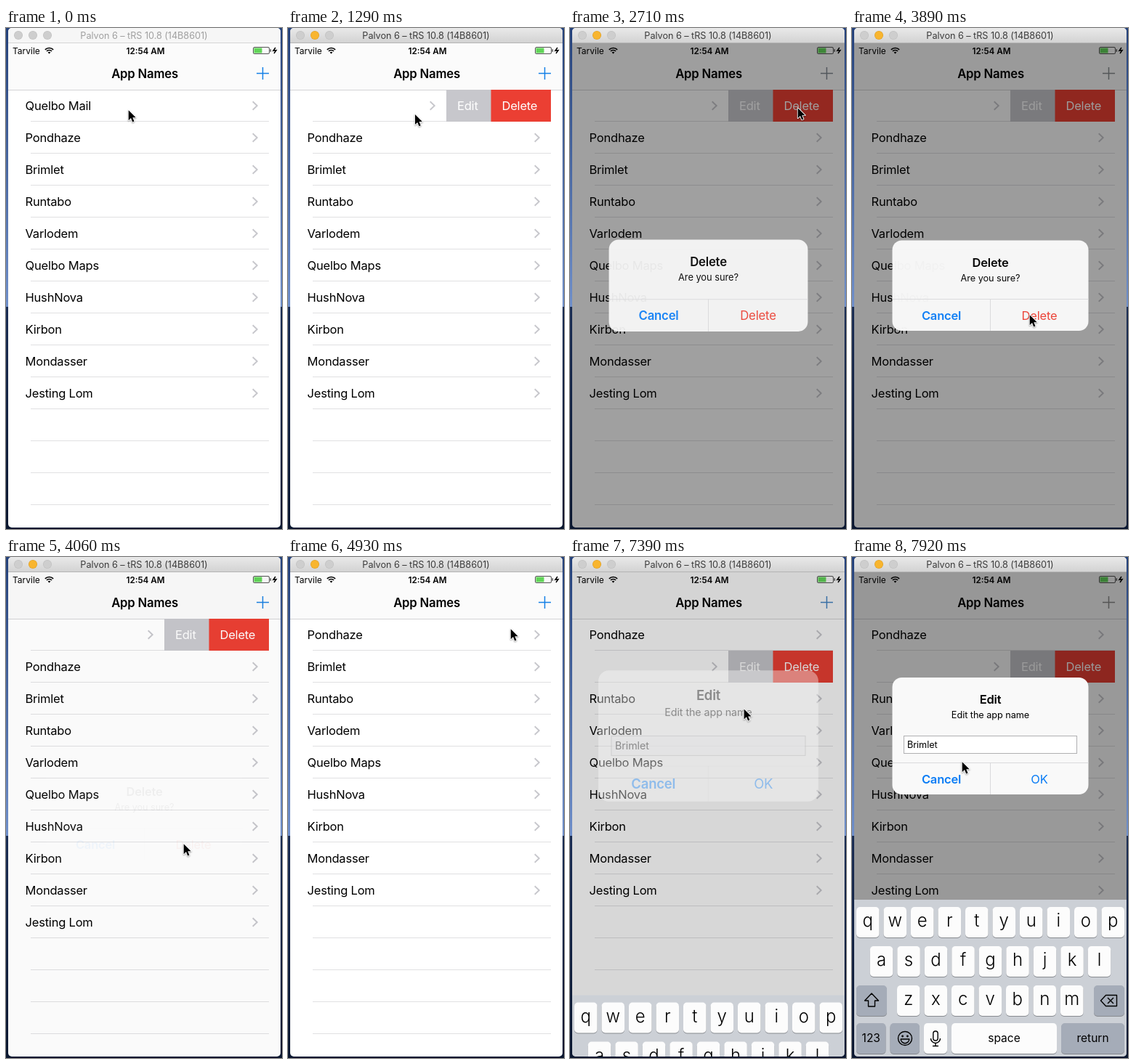
An HTML page with a canvas for the animation above (8 s loop, 380x690 px).

```html
<!DOCTYPE html>
<html lang="en">
<head>
<meta charset="utf-8">
<title>App Names</title>
<style>
html, body { margin: 0; width: 100%; height: 100%; overflow: hidden; background: #0d1c38; }
canvas { display: block; width: 380px; height: 690px; }
</style>
</head>
<body>
<canvas id="stage"></canvas>
<script>
const W = 380, H = 690, LOOP = 8000;
const ROW = 44, TOP = 85, LEFT = 19, RIGHT = 362, OPEN = 144;
const BLUE = '#0a7cf5', RED = '#eb3f33', GREY = '#c7c7cc', HAIR = '#e0e0e2';
const FONT = 'Inter, "Noto Sans", sans-serif';
const NAMES = ['Quelbo Mail', 'Pondhaze', 'Brimlet', 'Runtabo', 'Varlodem',
  'Quelbo Maps', 'HushNova', 'Kirbon', 'Mondasser', 'Jesting Lom'];

// Pointer moves, each from where the last one ended
const MOVES = [
  { at: 250, dur: 420, x: 50, y: 113 },
  { at: 760, dur: 350, x: 171, y: 118 },
  { at: 1230, dur: 680, x: 313, y: 109 },
  { at: 2760, dur: 900, x: 244, y: 394 },
  { at: 4480, dur: 450, x: 306, y: 98 },
  { at: 4930, dur: 440, x: 296, y: 148 },
  { at: 5470, dur: 400, x: 160, y: 148 },
  { at: 5890, dur: 610, x: 252, y: 150 },
  { at: 6960, dur: 250, x: 244, y: 204 },
  { at: 7310, dur: 570, x: 151, y: 281 },
];

const canvas = document.getElementById('stage');
const dpr = window.devicePixelRatio || 1;
canvas.width = W * dpr;
canvas.height = H * dpr;
const c = canvas.getContext('2d');

const ramp = (t, start, dur) => Math.min(1, Math.max(0, (t - start) / dur));
const easeOut = x => 1 - Math.pow(1 - x, 2.5);
const easeInOut = x => x < .5 ? 8 * x ** 4 : 1 - 8 * (1 - x) ** 4;
const smooth = x => x * x * (3 - 2 * x);
const mix = (a, b, p) => a + (b - a) * p;

function pointer(t) {
  let x = 168, y = 112;
  for (const m of MOVES) {
    const p = smooth(ramp(t, m.at, m.dur));
    x = mix(x, m.x, p);
    y = mix(y, m.y, p);
  }
  return [x, y];
}

function text(str, x, y, size, { color = '#000', weight = 400, align = 'left', track = -.2 } = {}) {
  c.font = `${weight} ${size}px ${FONT}`;
  c.letterSpacing = track + 'px';
  c.textAlign = align;
  c.fillStyle = color;
  c.fillText(str, x, y);
}

function rect(x, y, w, h, color) {
  c.fillStyle = color;
  c.fillRect(x, y, w, h);
}

function box(x, y, w, h, r, color) {
  c.beginPath();
  c.roundRect(x, y, w, h, r);
  c.fillStyle = color;
  c.fill();
}

function disc(x, y, r, color) {
  c.beginPath();
  c.arc(x, y, r, 0, Math.PI * 2);
  c.fillStyle = color;
  c.fill();
}

function line(points, color, width, close) {
  c.beginPath();
  points.forEach(([x, y]) => c.lineTo(x, y));
  if (close) c.closePath();
  c.strokeStyle = color;
  c.lineWidth = width;
  c.stroke();
}

function gradient(top, bottom, y, h) {
  const g = c.createLinearGradient(0, y, 0, y + h);
  g.addColorStop(0, top);
  g.addColorStop(1, bottom);
  return g;
}

function desktop() {
  const horizon = 384;
  rect(0, 0, W, horizon, gradient('#24417a', '#6f8fca', 0, horizon));
  rect(0, horizon, W, H - horizon, gradient('#1a2d54', '#0b1730', horizon, H - horizon));
}

function titleBar(active) {
  rect(3, 0, 375, 20, active ? gradient('#e9e9e9', '#d3d3d3', 0, 20) : '#f6f6f6');
  rect(3, 20, 375, 1, active ? '#b4b4b4' : '#d6d6d6');
  for (let i = 0; i < 3; i++) {
    const lit = active && i === 1;
    disc(17 + 20 * i, 10, 6, lit ? '#dd9f26' : '#bfbfbf');
    disc(17 + 20 * i, 10, 5.4, lit ? '#f8b52f' : '#cecece');
  }
  text('Palvon 6 – tRS 10.8 (14B8601)', 190, 14.5, 12.7,
    { align: 'center', color: active ? '#3d3d3d' : '#a0a0a0', track: -.05 });
}

function wifi(x, y) {
  for (const [r, width] of [[8, 1.7], [5, 1.7], [1.4, 2.6]]) {
    c.beginPath();
    c.arc(x, y, r, -Math.PI * .75, -Math.PI * .25);
    c.strokeStyle = '#000';
    c.lineWidth = width;
    c.stroke();
  }
}

function battery(x, y) {
  box(x, y, 23, 10, 2.5, '#555');
  box(x + 1, y + 1, 21, 8, 1.5, '#fbfbfb');
  rect(x + 1.5, y + 1.5, 11, 7, '#62d659');
  box(x + 23.5, y + 3, 1.5, 4, 1, '#555');
  line([[x + 31, y + 1], [x + 28, y + 5.3], [x + 32, y + 4.7], [x + 29, y + 9]], '#000', 1.5);
}

function navBar(dim) {
  rect(3, 21, 375, 64, '#fbfbfb');
  rect(3, 85, 375, 1, '#d4d4d6');
  text('Tarvile', 9, 35.5, 12, { track: 0 });
  wifi(59.5, 35.5);
  text('12:54 AM', 192, 35.5, 11.7, { weight: 600, align: 'center', track: 0 });
  battery(340, 26);
  text('App Names', 191, 69, 16.7, { weight: 600, align: 'center' });
  const tint = `rgb(${mix(20, 140, dim)},${mix(128, 140, dim)},${mix(230, 140, dim)})`;
  line([[345, 62.5], [362, 62.5]], tint, 1.5);
  line([[353.5, 54], [353.5, 71]], tint, 1.5);
}

function button(label, x, y, color) {
  rect(x, y, RIGHT - x, ROW, color);
  text(label, x + 15, y + 28, 16.5, { color: '#fff' });
}

function row(name, y, offset = 0, alpha = 1) {
  rect(LEFT, y + 1, RIGHT - LEFT, ROW - 1, '#fff');
  rect(34, y + 43, RIGHT - 34, 1, HAIR);
  if (!name) return;
  c.save();
  c.globalAlpha = alpha;
  c.beginPath();
  c.rect(LEFT, y, RIGHT - LEFT, ROW);
  c.clip();
  text(name, 26.5 - offset, y + 28, 16.5);
  const x = 339.7 - offset, mid = y + 22;
  line([[x, mid - 5.7], [x + 6, mid], [x, mid + 5.7]], GREY, 1.9);
  if (offset > 0) {
    button('Edit', RIGHT - offset, y, GREY);
    button('Delete', RIGHT - offset * .573, y, RED);
  }
  c.restore();
}

function list(t) {
  const gone = smooth(ramp(t, 4230, 350));
  const swipe = start => OPEN * easeOut(ramp(t, start, 500));
  const offsets = [swipe(260), 0, swipe(5480)];
  if (gone < 1) row(NAMES[0], TOP, offsets[0], 1 - gone);
  for (let i = 1; i < 15; i++) row(NAMES[i], TOP + ROW * (i - gone), offsets[i]);
}

function alertBox({ y, h, p, scale, title, message, field, ok, okColor = BLUE }) {
  const mid = 190.5, half = 135, bottom = y + h;
  const center = { align: 'center' }, bold = { align: 'center', weight: 600 };
  c.save();
  c.globalAlpha = p;
  c.translate(mid, y + h / 2);
  c.scale(scale, scale);
  c.translate(-mid, -y - h / 2);
  box(mid - half, y, 2 * half, h, 13, '#f9f9f9');
  text(title, mid, y + 36, 16.5, bold);
  text(message, mid, y + 56, 12.7, { ...center, track: -.05 });
  if (field) {
    rect(71, y + 80, 239, 25, '#b0b0b2');
    rect(72, y + 81, 237, 23, '#fff');
    text(field, 76, y + 97, 12.7, { track: -.05 });
  }
  rect(mid - half, bottom - 44, 2 * half, 1, '#dadadc');
  rect(190, bottom - 44, 1, 44, '#dadadc');
  text('Cancel', mid - half / 2, bottom - 15.5, 16.5, { ...bold, color: BLUE });
  text(ok, mid + half / 2, bottom - 15.5, 16.5, { ...center, color: okColor });
  c.restore();
}

function key(x, y, w, label, dark) {
  const letter = label.length === 1;
  box(x, y + 1, w, 42, 5, '#888b90');
  box(x, y, w, 42, 5, dark ? '#a5acb8' : '#fcfcfc');
  text(label, x + w / 2, y + (letter ? 27 : 26), letter ? 24 : 15.5,
    { align: 'center', weight: letter ? 300 : 400, track: 0 });
}

function icon(x, y, paint) {
  c.save();
  c.translate(x, y);
  c.lineJoin = 'round';
  c.strokeStyle = '#000';
  c.lineWidth = 1.4;
  paint();
  c.restore();
}

function shiftIcon() {
  const side = [[9.5, 1], [4.5, 1], [4.5, 9]];
  const other = side.map(([x, y]) => [-x, y]).reverse();
  line([[0, -9], ...side, ...other], '#000', 1.4, true);
}

function eraseIcon() {
  line([[-11, 0], [-4, -7.5], [11, -7.5], [11, 7.5], [-4, 7.5]], '#000', 1.4, true);
  for (const s of [-4, 4]) line([[-1.5, s], [6.5, -s]], '#000', 1.4);
}

function smileIcon() {
  c.beginPath();
  c.arc(0, 0, 9.5, 0, Math.PI * 2);
  c.stroke();
  for (const x of [-3.4, 3.4]) disc(x, -3, 1.4, '#000');
  c.beginPath();
  c.arc(0, 1, 5.8, 0, Math.PI);
  c.closePath();
  c.stroke();
}

function micIcon() {
  c.beginPath();
  c.roundRect(-3.2, -10, 6.4, 13, 3.2);
  c.stroke();
  c.beginPath();
  c.arc(0, 0, 6.5, Math.PI, 0, true);
  c.stroke();
  line([[0, 6.5], [0, 10.5]], '#000', 1.4);
  line([[-4, 10.5], [4, 10.5]], '#000', 1.4);
}

function keyboard(p) {
  const pitch = 37.5, [r1, r2, r3, r4] = [482, 536, 590, 642];
  const letters = (str, x, y) => [...str].forEach((ch, i) => key(x + pitch * i, y, 31.5, ch));
  c.save();
  c.translate(0, 216 * (1 - p));
  rect(3, 472, 375, 216, '#ccd0d6');
  letters('qwertyuiop', 6, r1);
  letters('asdfghjkl', 24.8, r2);
  letters('zxcvbnm', 62, r3);
  key(6, r3, 42, '', true);
  key(333, r3, 42, '', true);
  key(6, r4, 40.5, '123', true);
  key(52.5, r4, 40.5, '', true);
  key(99, r4, 32, '');
  key(137, r4, 145, 'space');
  key(288, r4, 87, 'return', true);
  icon(27, r3 + 20, shiftIcon);
  icon(353.5, r3 + 21, eraseIcon);
  icon(73, r4 + 21, smileIcon);
  icon(115, r4 + 21, micIcon);
  c.restore();
}

function arrow(x, y) {
  c.save();
  c.translate(x + .7, y + 1.2);
  c.lineJoin = 'round';
  c.shadowColor = 'rgba(0,0,0,.35)';
  c.shadowBlur = 2 * dpr;
  c.shadowOffsetY = dpr;
  line([[0, 0], [0, 14], [3.3, 10.9], [5.5, 16.2], [7.8, 15.2], [5.6, 10], [10, 10]], '#fff', 1.8, true);
  c.shadowColor = 'transparent';
  c.fillStyle = '#000';
  c.fill();
  c.restore();
}

function draw(t) {
  const ask = easeOut(ramp(t, 2450, 400));
  const asking = ask * (1 - easeInOut(ramp(t, 3800, 360)));
  const edit = easeOut(ramp(t, 7310, 450));
  const dim = Math.max(asking, edit);

  c.setTransform(dpr, 0, 0, dpr, 0, 0);
  desktop();
  c.save();
  c.beginPath();
  c.roundRect(3, 0, 375, 688, 5);
  c.clip();
  rect(3, 0, 375, 688, '#fff');
  navBar(dim);
  list(t);
  rect(3, 21, 375, 667, `rgba(0,0,0,${.4 * dim})`);
  titleBar(t >= 160);
  if (asking > 0) {
    alertBox({ y: 292.5, h: 124.5, p: asking, scale: 1.2 - .2 * ask,
      title: 'Delete', message: 'Are you sure?', ok: 'Delete', okColor: RED });
  }
  if (edit > 0) {
    keyboard(edit);
    alertBox({ y: 166, h: 161, p: edit, scale: 1.2 - .2 * edit,
      title: 'Edit', message: 'Edit the app name', field: NAMES[2], ok: 'OK' });
  }
  c.restore();
  arrow(...pointer(t));
}

const start = performance.now();
function tick() {
  draw((performance.now() - start) % LOOP);
  requestAnimationFrame(tick);
}
tick();
</script>
</body>
</html>
```
